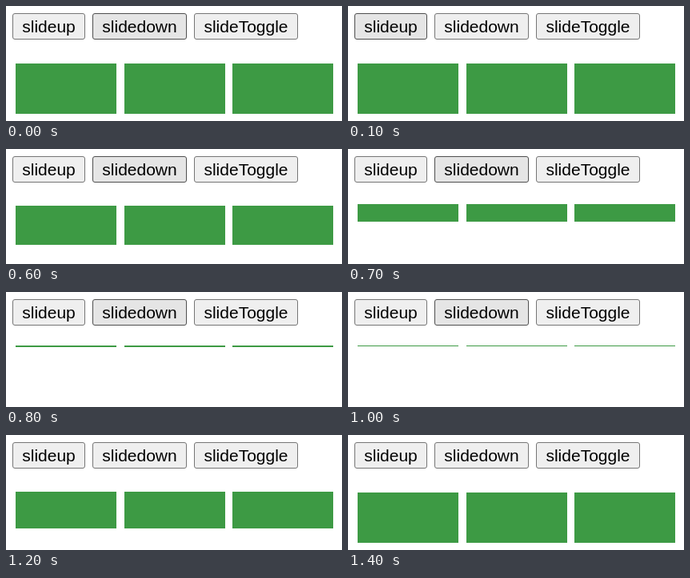
These frames come from a looping animation (420x144 px, 1500 ms). An HTML page:

```html
<!DOCTYPE html>
<html lang="en">
<head>
<meta charset="utf-8">
<title>Slide buttons</title>
<style>
html, body { margin: 0; width: 100%; height: 100%; overflow: hidden; background: #fff; }
svg { display: block; }
text { font: 21px Arial, "Liberation Sans", sans-serif; text-anchor: middle; fill: #000; }
.btn rect { fill: #efefef; stroke: #767676; }
.btn.hover rect { fill: #e5e5e5; stroke: #4f4f4f; }
.btn.active rect { fill: #f5f5f5; stroke: #8d8d8d; }
.box { fill: #3d9a44; shape-rendering: crispEdges; }
</style>
</head>
<body>
<svg width="420" height="144" viewBox="0 0 420 144">
  <g class="btn"><rect x="8.5" y="9.5" width="90" height="32" rx="2.5"/><text x="53.5" y="33">slideup</text></g>
  <g class="btn"><rect x="108.5" y="9.5" width="117" height="32" rx="2.5"/><text x="167" y="33">slidedown</text></g>
  <g class="btn"><rect x="235.5" y="9.5" width="129" height="32" rx="2.5"/><text x="300" y="33">slideToggle</text></g>
  <rect class="box" x="12" width="126"/>
  <rect class="box" x="148" width="126"/>
  <rect class="box" x="283" width="126"/>
</svg>
<script>
const LOOP = 1500, STEP = 100, FULL = 63;
const [up, down] = document.querySelectorAll('.btn');
const boxes = document.querySelectorAll('.box');

// Eased progress of a slide
function swing(t, start, length) {
  const p = Math.min(1, Math.max(0, (t - start) / length));
  return 0.5 - Math.cos(Math.PI * p) / 2;
}

function upState(t) {
  if (t < 100 || t >= 600) return '';
  return t === 400 ? 'active' : 'hover';
}

function downState(t) {
  if (t === 900) return 'active';
  return t < 100 || (t >= 600 && t <= 1000) ? 'hover' : '';
}

function draw(now) {
  const t = Math.floor(now % LOOP / STEP) * STEP;
  const open = 1 - swing(t, 491, 349) + swing(t, 977, 341);
  up.setAttribute('class', 'btn ' + upState(t));
  down.setAttribute('class', 'btn ' + downState(t));
  for (const box of boxes) {
    box.setAttribute('y', Math.round(67.2 + 5 * open));
    box.setAttribute('height', Math.floor(FULL * open + 0.3));
  }
}

const begin = performance.now();
function tick() {
  draw(performance.now() - begin);
  requestAnimationFrame(tick);
}
tick();
</script>
</body>
</html>
```
